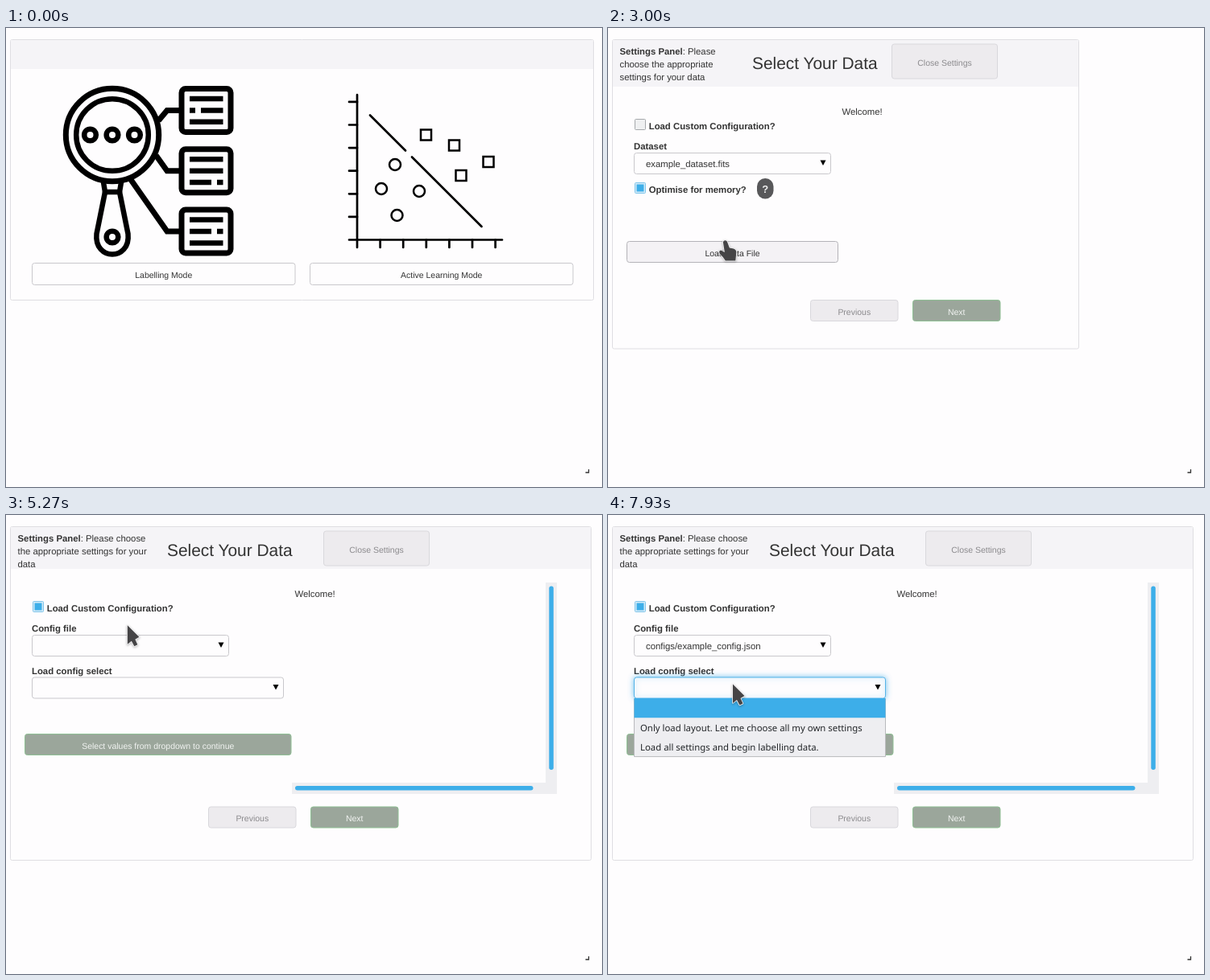
Recreate the animation shown at these times as an HTML page with a canvas. Size 740 by 571 pixels, loop 8000 ms.

```html
<!DOCTYPE html>
<html lang="en">
<head>
<meta charset="utf-8">
<title>Settings walkthrough</title>
<style>
html, body { margin: 0; width: 100%; height: 100%; overflow: hidden; background: #fefdfe; }
canvas { display: block; }
</style>
</head>
<body>
<canvas id="stage" width="740" height="571"></canvas>
<script>
const ctx = document.getElementById('stage').getContext('2d');
ctx.textRendering = 'geometricPrecision';
const LOOP = 8000;
const BG = '#fefdfe', INK = '#333', BLUE = '#3daee9';
const SANS = '"Liberation Sans", Arial, sans-serif';
const MENU = '"Noto Sans", sans-serif';
const LEFT = 32.5, ROW = 26;

const ENTER = 70, HOME_CLICK = 1470, SETTINGS = 1870, CHECK = 4530, CUSTOM = 4730,
      OPEN_FILE = 5800, PICK_FILE = 7000, OPEN_MODE = 7800;

const MOVES = [
  { from: ENTER, to: 1200, x: 135, y: 302 },
  { from: 2070, to: 2670, x: 146, y: 312 },
  { from: 2870, to: 3330, x: 147, y: 170 },
  { from: 3870, to: 4400, x: 147.5, y: 121 },
  { from: 5000, to: OPEN_FILE, x: 156, y: 162.5 },
  { from: 5930, to: 6530, x: 155, y: 217.5 },
  { from: 7730, to: 7930, x: 155, y: 210.5 }
];

const easeOut = k => 1 - (1 - k) ** 1.2;

function pointerAt(t) {
  let x = 12, y = 519;
  for (const move of MOVES) {
    const k = easeOut(Math.min(1, Math.max(0, (t - move.from) / (move.to - move.from))));
    x += (move.x - x) * k;
    y += (move.y - y) * k;
  }
  return { x, y };
}

function text(s, x, y, { size = 11.35, color = INK, bold = false, align = 'left', font = SANS } = {}) {
  ctx.font = `${bold ? 'bold ' : ''}${size}px ${font}`;
  ctx.textAlign = align;
  ctx.fillStyle = color;
  ctx.fillText(s, x, y);
}

function box(x, y, w, h, fill, stroke, radius = 0, line = 1) {
  ctx.beginPath();
  ctx.roundRect(x, y, w, h, radius);
  if (fill) { ctx.fillStyle = fill; ctx.fill(); }
  if (stroke) { ctx.strokeStyle = stroke; ctx.lineWidth = line; ctx.stroke(); }
}

function stroke(path, width, color = '#000') {
  ctx.strokeStyle = color;
  ctx.lineWidth = width;
  ctx.stroke(new Path2D(path));
}

function ring(x, y, r, width) {
  ctx.strokeStyle = '#000';
  ctx.lineWidth = width;
  ctx.beginPath();
  ctx.arc(x, y, r, 0, 2 * Math.PI);
  ctx.stroke();
}

const LOOKS = {
  plain: { fill: BG, border: '#c9c8cc', color: INK },
  hover: { fill: '#f4f2f5', border: '#b4b3b8', color: INK },
  pressed: { fill: '#e8e6e9', border: '#a9a8ad', color: INK },
  disabled: { fill: '#edebee', border: '#d9d8dc', color: '#8b8a8d' },
  next: { fill: '#9ba69b', border: '#8fc094', color: '#f1f3f1' }
};

function button(x, y, w, label, look = 'plain', h = ROW) {
  const { fill, border, color } = LOOKS[look];
  box(x, y, w, h, fill, border, 3);
  text(label, x + w / 2, y + h / 2 + 5, { size: 10.48, color, align: 'center' });
}

function checkbox(y, label, fill) {
  box(LEFT + 1, y + .5, 13, 13, fill ? '#d3ebf8' : '#eff0f1', fill ? '#7fc4ea' : '#a5a8ab', 1);
  if (fill) box(LEFT + 3, y + 2.5, 9, 9, fill);
  text(label, 50.7, y + 13, { bold: true });
}

function select(y, w, value, label, focused) {
  if (label) text(label, 32, y - 4, { bold: true });
  ctx.save();
  if (focused) { ctx.shadowColor = 'rgba(61,174,233,.7)'; ctx.shadowBlur = 7; }
  box(LEFT, y + .5, w, ROW, BG, focused ? '#55b3e8' : '#c9c8cc', 3);
  ctx.restore();
  text(value, 47, y + 18);
  ctx.fillStyle = '#000';
  ctx.fill(new Path2D(`M${LEFT + w - 13} ${y + 9.5}h7l-3.5 6.5z`));
}

function menu(y, w, items, active) {
  const row = 24.2;
  box(LEFT, y + .5, w, items.length * row - .5, '#eeeef1', '#b9babd');
  items.forEach((item, i) => {
    const on = i === active, top = y + i * row;
    if (on) box(LEFT, top, w, row, BLUE);
    text(item, 40, top + 16.3, { size: 11.36, font: MENU, color: on ? '#fcfcfc' : '#232629' });
  });
}

function panel(w, h, header) {
  box(5.5, 14.5, w, h, BG, '#dfdee2', 2);
  box(6, 15, w - 1, header, '#f5f4f7');
}

function magnifier(x, y) {
  for (let i = 0; i < 3; i++) {
    const angle = .74 * i - .3, top = 72 + 75.3 * i, split = i === 1 ? 2 : 1;
    stroke(`M${x + 60 * Math.cos(angle)} ${y + 60 * Math.sin(angle)}L200 ${top + 30.5}H218`, 7);
    box(218, top + 3.5, 61, 54, BG, '#000', 5, 7);
    for (let r = 0; r < 3; r++) {
      const gap = r !== split ? 'H269.5' : i ? 'H255M262 0H269.5' : 'H235M242 0H269.5';
      stroke(`M228 ${top + 16 + r * 14.4}${gap.replace('M262 0', 'm7 0').replace('M242 0', 'm7 0')}`, 6.5);
    }
    ring(x + 27.5 * (i - 1), y, 7.3, 6.6);
  }
  ring(x, y, 57.7, 7);
  ring(x, y, 44.8, 6.5);
  ring(x, y + 127, 7.3, 6.6);
  stroke(`M${x - 11.5} ${y + 56}l2.5 15h18l2.5 -15`, 6.5);
  stroke(`M${x - 9} ${y + 71}l-10.5 52c-3.5 34 42.5 34 39 0l-10.5 -52`, 6.5);
}

function scatter(x, y) {
  ctx.lineCap = 'round';
  stroke(`M${x} 83V273M426 ${y}H616M452 108.5l44 44M504 160.5l86.5 86.5`, 2.7);
  for (let i = 1; i <= 6; i++) {
    const step = 28.6 * i;
    stroke(`M${x} ${y - step}h-10M${x + step} ${y}v9.5`, 2.7);
  }
  ctx.lineCap = 'butt';
  for (const [cx, cy] of [[483, 170], [466, 200], [513, 203], [485.5, 233]]) ring(cx, cy, 7, 2.5);
  for (const [cx, cy] of [[521.5, 133], [556.5, 146], [599, 166.5], [565, 183.5]])
    box(cx - 6.5, cy - 6.5, 13, 13, null, '#000', 0, 2.5);
}

function home(t, over) {
  panel(724, 324, 36);
  magnifier(132, 133);
  scatter(436, 263.5);
  button(LEFT, 292.5, 326.5, 'Labelling Mode', t >= HOME_CLICK ? 'pressed' : over ? 'hover' : 'plain', 27);
  button(377.5, 292.5, 326.5, 'Active Learning Mode', 'plain', 27);
}

// heading shared by both settings pages; shift follows the page width
function heading(shift, intro) {
  text('Settings Panel', 14.5, 32.5, { bold: true });
  const indent = ctx.measureText('Settings Panel').width;
  intro.forEach((line, i) => text(line, 14.5 + (i ? 0 : indent), 32.5 + 16.2 * i));
  text('Select Your Data', 179 + shift / 2, 51, { size: 20.9 });
  button(352.5 + shift, 20, 131, 'Close Settings', 'disabled', 43);
}

function navigation(y) {
  button(251.5, y, 108.5, 'Previous', 'disabled');
  button(378.5, y, 108.5, 'Next', 'next');
}

function settings(t, over) {
  panel(579, 384.5, 58);
  heading(0, [': Please', 'choose the appropriate', 'settings for your data']);
  text('Welcome!', 290.5, 108);
  checkbox(113, 'Load Custom Configuration?', t >= CHECK && '#8ac8e8');
  select(155, 244, 'example_dataset.fits', 'Dataset');
  checkbox(192, 'Optimise for memory?', BLUE);
  box(185, 187, 20.5, 25.5, '#58585a', null, 10);
  text('?', 195.3, 204.5, { size: 13, bold: true, color: '#eee', align: 'center' });
  button(23.5, 265.5, 262, 'Load Data File', over ? 'hover' : 'plain');
  navigation(338.5);
}

function custom(t, y) {
  panel(721, 415, 52);
  heading(42, [': Please choose', 'the appropriate settings for your', 'data']);
  text('Welcome!', 358.5, 102);
  box(670, 84, 14, 263, '#eeeef1');
  box(355, 333, 329, 14, '#eeeef1');
  box(674.3, 88.5, 5.5, 228.5, BLUE, null, 3);
  box(359, 337, 295.5, 5.5, BLUE, null, 3);
  checkbox(107, 'Load Custom Configuration?', BLUE);
  button(23.5, 272.5, 330.5, 'Select values from dropdown to continue', 'next');
  navigation(363);
  const file = 'configs/example_config.json';
  select(149, 244, t >= PICK_FILE ? file : '', 'Config file', t >= OPEN_FILE && t < OPEN_MODE);
  select(201.5, 312, '', 'Load config select', t >= OPEN_MODE);
  if (t >= OPEN_FILE && t < PICK_FILE) menu(175.5, 244, ['', file], y > 200 ? 1 : 0);
  if (t >= OPEN_MODE)
    menu(228, 312, ['', 'Only load layout. Let me choose all my own settings', 'Load all settings and begin labelling data.'], 0);
}

const ARROW = new Path2D('M0 0V23.5L5 19.5L8.5 26L12.5 24L9.5 17.5L14.5 14.5Z');
const HAND = new Path2D('M-3.5 1Q-1.5-2 1.5 .5L4.5 8.5L9.5 9.5Q13 10.5 13 14L12 24.5H-.5Q-3 20-7.5 16Q-9.5 12-6 11.5L-1.5 14Z');

function pointer({ x, y }, hand) {
  const shape = hand ? HAND : ARROW;
  ctx.save();
  ctx.translate(x, y);
  ctx.lineJoin = 'round';
  ctx.shadowColor = 'rgba(0,0,0,.35)';
  ctx.shadowBlur = 3;
  ctx.shadowOffsetY = 1;
  ctx.strokeStyle = '#f4f4f5';
  ctx.lineWidth = 1.6;
  ctx.stroke(shape);
  ctx.shadowColor = 'transparent';
  ctx.fillStyle = '#454446';
  ctx.fill(shape);
  ctx.restore();
}

function draw(now) {
  const t = now % LOOP;
  const tip = pointerAt(t);
  const hotspot = t < SETTINGS ? 292 : t < CUSTOM ? 264 : Infinity;
  const over = t >= ENTER && tip.y >= hotspot && tip.y < hotspot + 28;

  box(0, 0, 740, 571, BG);
  if (t < SETTINGS) home(t, over);
  else if (t < CUSTOM) settings(t, over);
  else custom(t, tip.y);
  stroke('M719.5 553H723.5V549', 1.3, '#333');
  if (t >= ENTER) pointer(tip, over);
  requestAnimationFrame(draw);
}
requestAnimationFrame(draw);
</script>
</body>
</html>
```
